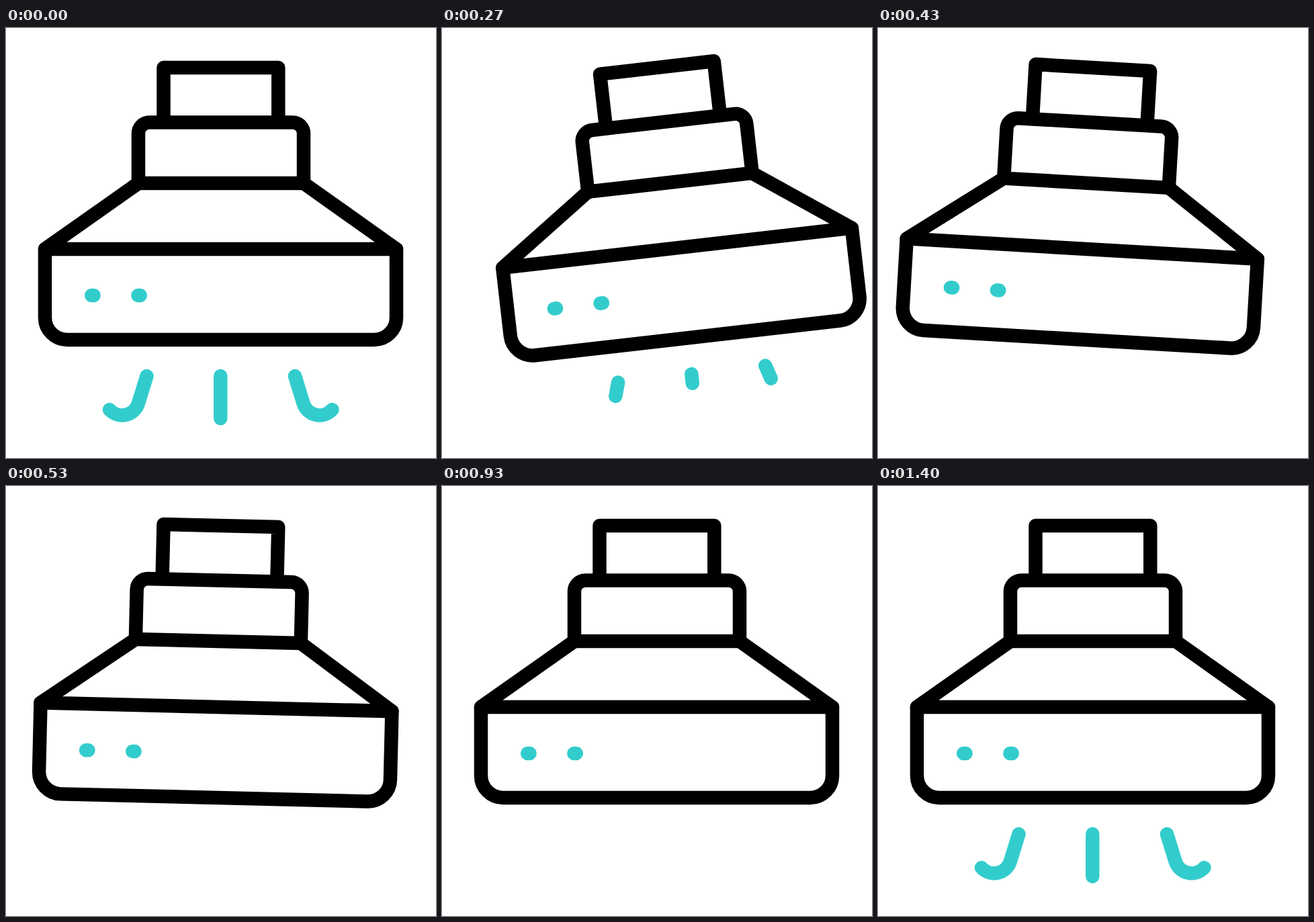
Recreate the animation shown at these times as an HTML page. Size 640x640 px, loop 1670 ms.

```html
<!DOCTYPE html>
<html lang="en">
<head>
<meta charset="utf-8">
<title>Cooker hood</title>
<style>
  html, body { margin: 0; width: 100%; height: 100%; overflow: hidden; background: #fff; }
  svg { display: block; width: 100%; height: 100%; }
  path { fill: none; stroke: #000; stroke-width: 20.5; stroke-linecap: round; stroke-linejoin: round; }
  .accent { stroke: #3cc; }
</style>
</head>
<body>
<svg viewBox="0 0 640 640">
  <g id="hood">
    <path d="M234.5 140V59H405.3V140"/>
    <path d="M197 231V157a16.5 16.5 0 0 1 16.5-16.5H426.5a16.5 16.5 0 0 1 16.5 16.5V231Z"/>
    <path d="M197 231L58 329H581L443 231"/>
    <path d="M58 329V431a33 33 0 0 0 33 33H548a33 33 0 0 0 33-33V329"/>
    <path class="accent" d="M127.2 398h3.4M196.4 398h3.4"/>
    <g id="air">
      <path class="accent" pathLength="1" d="M209.5 518L197 558.5A25.3 25.3 0 0 1 154 568"/>
      <path class="accent" pathLength="1" d="M319.3 518V581"/>
      <path class="accent" pathLength="1" d="M430 518L442.5 558.5A25.3 25.3 0 0 0 485.5 568"/>
    </g>
  </g>
</svg>
<script>
  const LOOP = 1670;
  const hood = document.getElementById('hood');
  const air = document.getElementById('air');

  // Keys are [tick, value], 30 ticks per second, eased in and out.
  const swing = [[2.1, 0], [7.2, -7.4], [11.75, 3.6], [19.1, 0]];
  const flow = [[2.45, 1], [10.4, 0], [16.4, 0], [22, 1], [28, 0], [31.5, 0], [42, 1]];

  function sample(keys, tick) {
    const next = keys.findIndex(([at]) => at > tick);
    if (next === 0) return keys[0][1];
    if (next < 0) return keys[keys.length - 1][1];
    const [t0, v0] = keys[next - 1];
    const [t1, v1] = keys[next];
    const p = (tick - t0) / (t1 - t0);
    return v0 + (v1 - v0) * p * p * (3 - 2 * p);
  }

  function draw(ms) {
    const tick = Math.floor((Math.floor(ms / 10) * 10 + 4) * 0.03);
    hood.setAttribute('transform', `rotate(${sample(swing, tick)} 319.5 59)`);
    const shown = sample(flow, tick);
    air.setAttribute('visibility', shown > 0.001 ? 'visible' : 'hidden');
    air.setAttribute('stroke-dasharray', shown < 1 ? `${shown} 3` : 'none');
  }

  const start = performance.now();
  function loop() {
    draw((performance.now() - start) % LOOP);
    requestAnimationFrame(loop);
  }
  loop();
</script>
</body>
</html>
```
